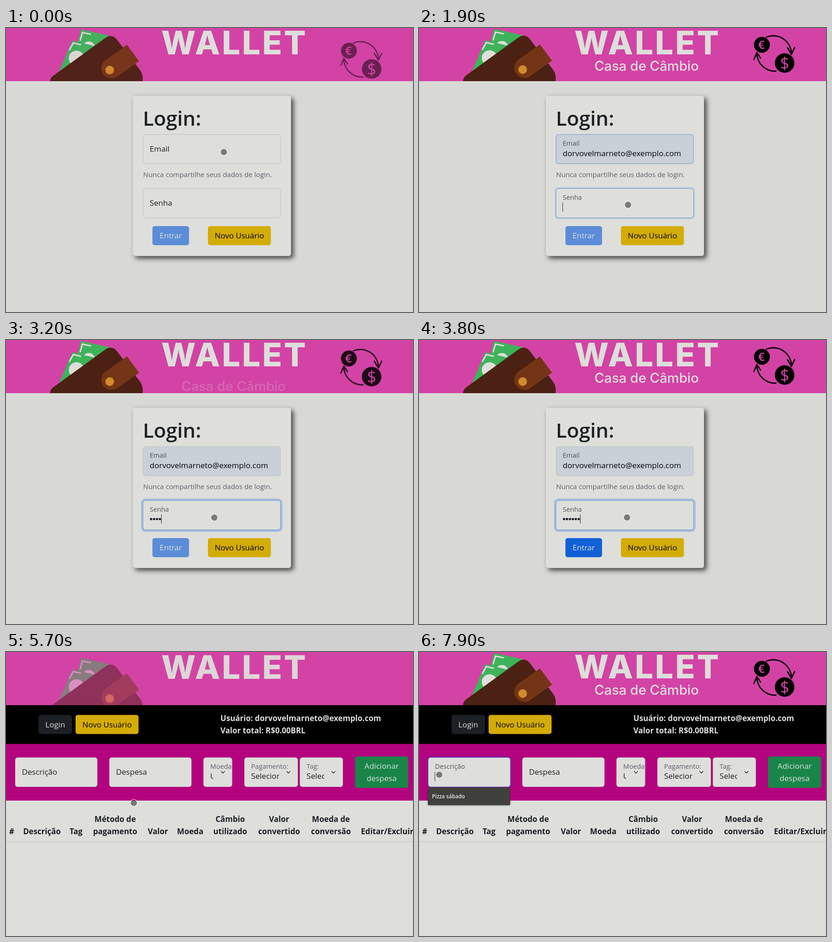
Write an HTML page with a canvas that moves like this. It is 895 by 625 pixels and loops after 8000 ms.

```html
<!DOCTYPE html>
<html lang="pt-BR">
<head>
<meta charset="utf-8">
<title>Wallet</title>
<style>
html, body { margin: 0; width: 100%; height: 100%; overflow: hidden; background: #d8d9d5; }
canvas { display: block; }
</style>
</head>
<body>
<canvas id="stage" width="895" height="625"></canvas>
<script>
const LOOP = 8000, W = 895, H = 625, BANNER = 117;
const ctx = document.getElementById('stage').getContext('2d');
const layer = document.createElement('canvas');
layer.width = W;
layer.height = 160;
const lctx = layer.getContext('2d');

const SANS = '"Open Sans", "Noto Sans", sans-serif';
const BODY = '17.1px ' + SANS, BOLD = 'bold 17.1px ' + SANS, MENU = '600 11.7px ' + SANS;
const PAPER = '#dedfdb', INK = '#1c2024', MUTED = '#5a6166', LINE = '#bfc0bd';
const PINK = '#d343a5', YELLOW = '#d4ac06', LIGHT = '#dddeda';
const EMAIL = 'dorvovelmarneto@exemplo.com';
const SAVED = [EMAIL, 'teste@teste.com', 'dorvo@dorvo.com', 'emailcom@', 'emaicom@'];

const T = { email: 300, menu: 380, preview: 800, pick: 1250, senha: 1800,
  ready: 3750, page: 4550, descr: 7780 };
const KEYS = [2450, 2630, 2780, 3150, 3450, T.ready];
const PATH = [[0, 479, 273], [350, 479, 273], [1000, 484, 311], [1250, 485, 319],
  [1450, 485, 321], [1950, 459, 391], [2700, 458.5, 391], [3800, 457.5, 390.5],
  [4400, 372, 449], [4700, 372, 449], [4900, 371, 448], [5050, 371, 448],
  [5700, 281, 332], [5900, 300, 288], [6500, 334, 246], [6850, 332, 247],
  [7700, 44.5, 270], [8000, 44.5, 270]];

const clamp = v => Math.max(0, Math.min(1, v));
const mix = (a, b, p) => a + (b - a) * p;
const smooth = p => p * p * (3 - 2 * p);

function text(str, x, y, font = BODY, color = INK, align = 'left', c = ctx) {
  c.font = font;
  c.fillStyle = color;
  c.textAlign = align;
  c.fillText(str, x, y);
}

function box(x, y, w, h, r, fill, stroke) {
  ctx.beginPath();
  ctx.roundRect(x, y, w, h, r);
  if (fill) { ctx.fillStyle = fill; ctx.fill(); }
  if (stroke) { ctx.strokeStyle = stroke; ctx.lineWidth = 1; ctx.stroke(); }
}

function rect(x, y, w, h, fill) {
  ctx.fillStyle = fill;
  ctx.fillRect(x, y, w, h);
}

function clipped(x, y, w, h, draw) {
  ctx.save();
  ctx.beginPath();
  ctx.rect(x, y, w, h);
  ctx.clip();
  draw();
  ctx.restore();
}

function shape(c, d, fill) {
  c.fillStyle = fill;
  c.fill(new Path2D(d));
}

function disc(c, x, y, r, fill) {
  c.beginPath();
  c.arc(x, y, r, 0, 7);
  c.fillStyle = fill;
  c.fill();
}

function strokePath(c, d, color, width) {
  c.strokeStyle = color;
  c.lineWidth = width;
  c.stroke(new Path2D(d));
}

/* Banner */

function drawTitle(c) {
  c.letterSpacing = '4px';
  text('WALLET', 502.5, 57.5, '800 71.5px Inter, sans-serif', LIGHT, 'center', c);
  c.letterSpacing = '0px';
}

function drawWallet(c) {
  shape(c, 'M165 2L228 16L205 60L148 70Z', '#3eb459');
  disc(c, 182, 42, 13.5, LIGHT);
  strokePath(c, 'M163 27L168 9L187 13', LIGHT, 3);
  shape(c, 'M146 27L204 41L170 100L110 110Z', '#3eb459');
  disc(c, 155, 66, 17, LIGHT);
  strokePath(c, 'M139 48L148 32L165 36', LIGHT, 3);
  shape(c, 'M97 117Q97 109 104 104L217 22Q233 10 245 26L295 92Q303 104 300 118V150H97Z', '#4b2113');
  shape(c, 'M266 36L292.5 72L243 107A22.3 22.3 0 0 1 217 71Z', '#743516');
  disc(c, 228, 91.5, 9.5, '#d08c28');
}

function drawExchange(c) {
  c.lineCap = c.lineJoin = 'round';
  strokePath(c, 'M764 20A40 40 0 0 1 819 57M810 43L819 58L826 43', '#000', 2.8);
  strokePath(c, 'M785 95A40 40 0 0 1 743 55M736.5 69L743 54L751 66', '#000', 2.8);
  c.lineCap = 'butt';
  c.lineJoin = 'miter';
  disc(c, 754, 37, 17.5, '#000');
  disc(c, 804, 77, 21.5, '#000');
  text('€', 753, 46, '600 25px ' + SANS, PINK, 'center', c);
  text('$', 804, 90, '36px ' + SANS, PINK, 'center', c);
}

function drawSubtitle(c) {
  text('Casa de Câmbio', 500.5, 94, '500 29.4px Inter, sans-serif', LIGHT, 'center', c);
}

const RISERS = [[drawTitle, 24], [drawWallet, 22], [drawExchange, 26], [drawSubtitle, 24]];

// Parts rise and fade in one after another, every three seconds.
function drawBanner(t) {
  rect(0, 0, W, BANNER, PINK);
  const c = (t - 2224 + 3000) % 3000;
  clipped(0, 0, W, BANNER, () => RISERS.forEach(([draw, rise], i) => {
    const u = clamp((c - 300 * i) / 600), p = 1 - (1 - u) ** 2;
    if (!p) return;
    lctx.clearRect(0, 0, W, 160);
    draw(lctx);
    ctx.globalAlpha = p;
    ctx.drawImage(layer, 0, rise * (1 - p));
    ctx.globalAlpha = 1;
  }));
}

/* Form parts */

function button(x, y, w, h, fill, label, color) {
  box(x, y, w, h, 5, fill);
  text(label, x + w / 2, y + h / 2 + 6, BODY, color, 'center');
}

// "up" moves the label to its small position, "ring" grows the focus glow.
function field(x, y, w, h, label, { up = 0, ring = 0, fill = PAPER } = {}) {
  if (ring) {
    const s = 4.5 * ring;
    ctx.beginPath();
    ctx.roundRect(x - s, y - s, w + 2 * s, h + 2 * s, 5 + s);
    ctx.roundRect(x, y, w, h, 5);
    ctx.fillStyle = `rgba(13,95,217,${0.28 * ring})`;
    ctx.fill('evenodd');
  }
  box(x, y, w, h, 5, fill, ring ? '#7d9fd2' : LINE);
  ctx.globalAlpha = mix(1, 0.72, up);
  text(label, x + 14.5, y + mix(37.7, 24.7, up), `${mix(17.1, 14.6, up)}px ${SANS}`);
  ctx.globalAlpha = 1;
}

function caret(x, y, since) {
  if (since % 1000 < 600) rect(x, y, 1, 20, INK);
}

function menu(x, y, w, h) {
  ctx.save();
  ctx.shadowColor = 'rgba(0,0,0,.45)';
  ctx.shadowBlur = 3;
  ctx.shadowOffsetY = 1;
  box(x, y, w, h, 3, '#40403c');
  ctx.restore();
}

/* Login page */

function drawEmail(t) {
  const preview = t >= T.preview, picked = t >= T.pick;
  const ring = clamp((t - T.email) / 150) * (1 - clamp((t - T.senha) / 150));
  field(301.5, 234.5, 302, 64, 'Email',
    { up: clamp((t - T.email) / 100), ring, fill: preview ? '#c9d0d8' : PAPER });
  if (picked) text(EMAIL, 316, 281.5, BODY, '#050505');
  else if (preview) text(EMAIL, 316, 282, '16px "Liberation Sans", Arial, sans-serif', '#050505');
  if (t >= T.email && t < T.senha) {
    const end = picked ? 316 + ctx.measureText(EMAIL).width : 315.5;
    caret(end, 265.5, picked ? t - T.pick : t - T.preview + 1000);
  }
}

function drawSenha(t) {
  const p = clamp((t - T.senha) / 100);
  field(301.5, 353.5, 302, 64, 'Senha', { up: p, ring: clamp((t - T.senha) / 150) });
  const typed = KEYS.filter(k => t >= k);
  typed.forEach((_, i) => disc(ctx, 319 + 6.45 * i, 394, 2.6, INK));
  if (p) caret(315.5 + 6.45 * typed.length, 384, t - (typed.at(-1) || T.senha));
}

function drawLogin(t) {
  rect(0, BANNER, W, H, '#d8d9d5');
  ctx.save();
  ctx.shadowColor = 'rgba(0,0,0,.68)';
  ctx.shadowBlur = 11;
  ctx.shadowOffsetX = ctx.shadowOffsetY = 5.7;
  box(278.5, 148.5, 348, 353, 5, PAPER);
  ctx.restore();
  box(278.5, 148.5, 348, 353, 5, PAPER, '#c4c5c1');
  text('Login:', 301, 215, '600 44.2px ' + SANS);
  text('Nunca compartilhe seus dados de login.', 301.5, 328, '15.2px ' + SANS, MUTED);
  drawSenha(t);
  drawEmail(t);
  button(322, 436, 80.5, 42, t >= T.ready ? '#1160d6' : '#5b8cd8', 'Entrar', PAPER);
  button(444, 436, 138.5, 42, YELLOW, 'Novo Usuário', '#000');
  if (t >= T.menu && t < T.pick) {
    menu(301.5, 300, 302, 147);
    if (t >= T.preview) rect(301.5, 306, 302, 27, '#5a5a57');
    SAVED.forEach((s, i) => text(s, 310, 324 + 27 * i, MENU, '#e8e8e4'));
  }
}

/* Expense page */

function select(x, w, label, value, room, arrow) {
  box(x, 232.5, w, 64, 5, PAPER, LINE);
  clipped(x, 232, w, 65, () => text(label, x + 14.5, 257, '14.6px ' + SANS, MUTED));
  clipped(x, 232, room, 65, () => text(value, x + 14.5, 279));
  strokePath(ctx, `M${arrow - 4} 262.5l4 4l4 -4`, INK, 1.4);
}

const COLUMNS = [[12.5, '#'], [79, 'Descrição'], [154, 'Tag'], [240, 'pagamento', 'Método de'],
  [334, 'Valor'], [405, 'Moeda'], [493, 'utilizado', 'Câmbio'], [600.5, 'convertido', 'Valor'],
  [714.5, 'conversão', 'Moeda de']];

function drawExpenses(t) {
  rect(0, BANNER, W, 85.5, '#000');
  rect(0, 202.5, W, 124.5, '#b4037f');
  rect(0, 327, W, 298, PAPER);

  button(71.5, 138.5, 73.5, 42, '#1c1f23', 'Login', PAPER);
  button(153, 138.5, 138.5, 42, YELLOW, 'Novo Usuário', '#000');
  text('Usuário: ' + EMAIL, 471.5, 152, BOLD, PAPER);
  text('Valor total: R$0.00BRL', 471.5, 179, BOLD, PAPER);

  field(20.5, 232.5, 180, 64, 'Descrição',
    { up: clamp((t - T.descr) / 100), ring: clamp((t - T.descr) / 150) });
  field(227.5, 232.5, 180, 64, 'Despesa');
  select(434.5, 62.5, 'Moeda:', 'USD', 21, 477);
  select(524.5, 117, 'Pagamento:', 'Selecione', 76.5, 621);
  select(646.5, 94, 'Tag:', 'Selecione', 53, 720);
  box(767.5, 230, 117, 69, 5, '#1a8549');
  text('Adicionar', 826, 257, BODY, PAPER, 'center');
  text('despesa', 826, 284, BODY, PAPER, 'center');

  for (const [x, low, high] of COLUMNS) {
    text(low, x, 401, BOLD, INK, 'center');
    if (high) text(high, x, 374, BOLD, INK, 'center');
  }
  text('Editar/Excluir', 780.5, 401, BOLD);
  rect(0, 417, W, 1, '#c4c5c1');

  if (t >= T.descr) {
    caret(34.5, 264, t - T.descr);
    menu(19.5, 298, 181, 39);
    text('Pizza sábado', 28.5, 322, MENU, '#e8e8e4');
  }
}

function drawPointer(t) {
  const i = PATH.findIndex(k => k[0] > t);
  const [t0, x0, y0] = PATH[i - 1], [t1, x1, y1] = PATH[i];
  const p = smooth((t - t0) / (t1 - t0));
  const x = mix(x0, x1, p), y = mix(y0, y1, p);
  disc(ctx, x, y, 7.2, 'rgba(0,0,0,.45)');
  ctx.beginPath();
  ctx.arc(x, y, 7.6, 0, 7);
  ctx.strokeStyle = 'rgba(255,255,255,.6)';
  ctx.lineWidth = 1.5;
  ctx.stroke();
}

const start = performance.now();
function frame() {
  const t = Math.max(0, performance.now() - start) % LOOP;
  if (t < T.page) drawLogin(t);
  else drawExpenses(t);
  drawBanner(t);
  drawPointer(t);
  requestAnimationFrame(frame);
}
frame();
</script>
</body>
</html>
```
